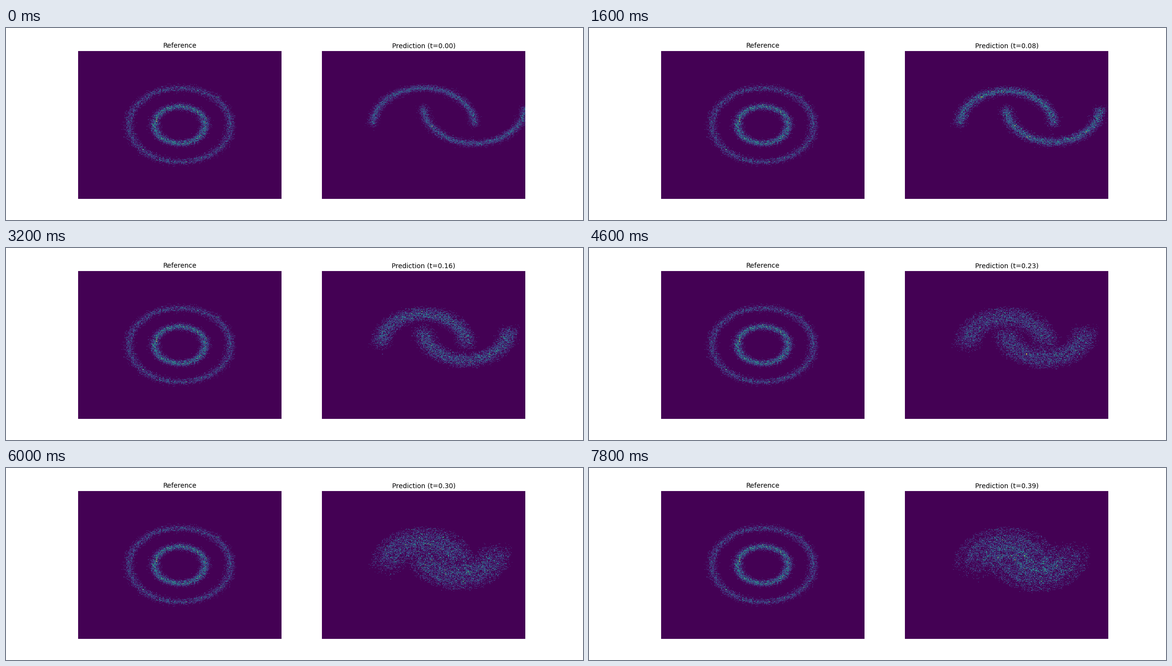
A matplotlib script that plays this animation: 1200 px wide and 400 px high, repeating every 8000 ms.

```python
import numpy as np
import matplotlib.pyplot as plt
from matplotlib.animation import FuncAnimation

SAMPLES, BINS, SPAN = 10000, 300, 2.0
NOISE = 0.05
FRAMES, INTERVAL, DT = 40, 200, 0.01
GRID, BOX = 256, 6.0  # periodic grid for the velocity field

rng = np.random.default_rng(7)
step = BOX / GRID
freq = 2 * np.pi * np.fft.fftfreq(GRID, step)
kx, ky = np.meshgrid(freq, freq, indexing="ij")


def moons(n):
    a = np.linspace(0, np.pi, n // 2)
    upper = np.column_stack([np.cos(a), np.sin(a)])
    lower = np.column_stack([1 - np.cos(a), 0.5 - np.sin(a)])
    return np.vstack([upper, lower])


def circles(n):
    a = np.linspace(0, 2 * np.pi, n // 2, endpoint=False)
    ring = np.column_stack([np.cos(a), np.sin(a)])
    return np.vstack([ring, 0.5 * ring])


def noisy(points):
    return points + rng.normal(0, NOISE, points.shape)


def transform(points, scale):
    """Fourier transforms of the scaled, blurred density and its two moments."""
    px, py = points.T
    ex = np.exp(-1j * scale * np.outer(freq, px))
    ey = np.exp(-1j * scale * np.outer(freq, py)).T
    blur = np.exp(-0.5 * (scale * NOISE) ** 2 * (kx**2 + ky**2)) / len(points)
    mass = ex @ ey * blur
    drift = 1j * NOISE**2 * scale * mass
    return mass, (ex * px) @ ey * blur - drift * kx, ex @ (ey * py[:, None]) * blur - drift * ky


def velocity(t):
    """Mean of x1 - x0 given the position at time t, for straight paths."""
    a, ax, ay = transform(START, 1 - t)
    b, bx, by = transform(END, t)
    back = lambda f: np.fft.ifft2(f).real / step**2
    density = np.maximum(back(a * b), 1e-4)
    flux = np.stack([back(a * bx - ax * b), back(a * by - ay * b)], axis=-1)
    return flux / density[..., None]


def sample(field, points):
    """Bilinear lookup on the periodic grid."""
    u = points / step
    cell = np.floor(u).astype(int)
    fx, fy = (u - cell).T[..., None]
    i, j = cell.T % GRID
    i2, j2 = (i + 1) % GRID, (j + 1) % GRID
    return ((1 - fx) * ((1 - fy) * field[i, j] + fy * field[i, j2])
            + fx * ((1 - fy) * field[i2, j] + fy * field[i2, j2]))


def counts(points):
    edges = [[-SPAN, SPAN]] * 2
    return np.histogram2d(*points.T, bins=BINS, range=edges)[0].T


START, END = moons(240), circles(300)
reference = counts(noisy(circles(SAMPLES)))

points = noisy(moons(SAMPLES))
history = []
for n in range(FRAMES):
    history.append(counts(points))
    points = points + DT * sample(velocity(n * DT), points)

fig, axes = plt.subplots(1, 2, figsize=(12, 4), dpi=100)


def panel(ax, data, text):
    ax.axis("off")
    image = ax.imshow(data, origin="lower", aspect="auto", cmap="viridis",
                      interpolation="nearest", extent=[-SPAN, SPAN, -SPAN, SPAN])
    return image, ax.set_title(text, fontsize=10, pad=5)


panel(axes[0], reference, "Reference")
image, title = panel(axes[1], history[0], "Prediction (t=0.00)")


def update(n):
    image.set_data(history[n])
    image.set_clim(0, history[n].max())
    title.set_text(f"Prediction (t={n * DT:.2f})")
    return image, title


anim = FuncAnimation(fig, update, frames=FRAMES, interval=INTERVAL,
                     repeat=True, repeat_delay=0, blit=False)
plt.show()
```
